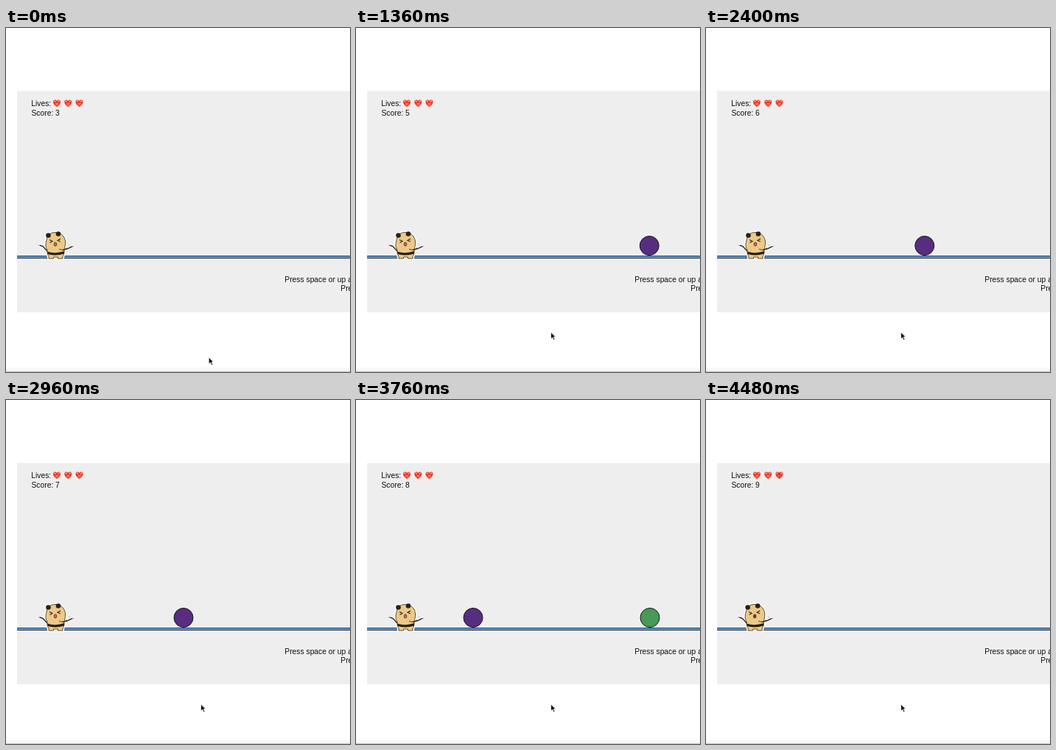
An HTML page for the animation above (4560 ms loop, 467 by 467 pixels).

```html
<!DOCTYPE html>
<html lang="en">
<head>
<meta charset="utf-8">
<title>Jump game</title>
<style>
  html, body { margin: 0; width: 100%; height: 100%; overflow: hidden; background: #fff; }
  svg { display: block; width: 467px; height: 467px; }
  text { font: 10.3px "Liberation Sans", Arial, sans-serif; fill: #111; }
</style>
</head>
<body>
<svg viewBox="0 0 467 467">
  <defs>
    <linearGradient id="fade" x2="0" y2="1">
      <stop offset="0" stop-color="#fff"/>
      <stop offset="1" stop-color="#f4f4f4"/>
    </linearGradient>
    <g id="heart">
      <path d="M0 5.2C-3 3-5 1-5-1.6C-5-5-1.4-5.6 0-3C1.4-5.6 5-5 5-1.6C5 1 3 3 0 5.2Z" fill="#ee3524"/>
      <path d="M-3.6-3.2l2 1.6M3.6-3.2l-2 1.6M-1.6.6Q0 2 1.8.4" fill="none" stroke="#ffd9c4" stroke-width="1.1"/>
      <path d="M-2.6 2.3L0 4.3L2.6 2.3" fill="none" stroke="#f98a3c" stroke-width=".9"/>
    </g>
    <path id="body" d="M55 288C56 280 61 277.500 67 277.500C75 277.500 80 283 80.500 290C81 295 79.500 298 79 301C79.500 305 78.500 308 77 310V313H70.500V311H64.500V313H58V310C56 307 55.500 304 56 301C53.500 298 53.500 293 55 288Z"/>
    <path id="arms" d="M56 303L50 296.500L46 295M77 301.500L84 299.500L90 296.500"/>
  </defs>

  <rect x="15" y="85.500" width="452" height="300.500" fill="#eee"/>
  <rect y="459" width="467" height="7" fill="url(#fade)"/>
  <rect y="466" width="467" height="1" fill="#c4c4c4"/>

  <text x="34.300" y="106">Lives:</text>
  <use href="#heart" x="69" y="102"/>
  <use href="#heart" x="84.300" y="102"/>
  <use href="#heart" x="99.500" y="102"/>
  <path id="crack" d="M100 98.500L98.700 101L100.500 102.500L99.300 105.500" fill="none" stroke="#5a1a14" stroke-width=".8"/>
  <text x="34.500" y="118.600" id="score">Score: 3</text>
  <text x="378.300" y="344.500">Press space or up arrow to jump</text>
  <text x="454.300" y="357">Press enter to start</text>

  <rect x="15" y="309" width="452" height="4" fill="#5b9bd5"/>
  <path d="M15 309.500H467M15 312.500H467" stroke="#2b3440" stroke-width=".9"/>

  <g id="hero">
    <g fill="#fff" stroke="#fff" stroke-width="4" stroke-linejoin="round" stroke-linecap="round">
      <use href="#body"/>
      <use href="#arms" fill="none"/>
      <circle cx="57.500" cy="281.500" r="2.500"/>
      <circle cx="71" cy="279.500" r="2.500"/>
    </g>
    <use href="#body" fill="#ecc987" stroke="#4a3a24" stroke-width=".9"/>
    <g fill="#25211f">
      <circle cx="57.500" cy="281.500" r="3.300"/>
      <circle cx="71" cy="279.500" r="3.300"/>
      <path d="M56 303.500Q67 307 79 303V306.500Q67 310 56.500 307Z"/>
    </g>
    <use href="#arms" fill="none" stroke="#35302e" stroke-width="1.500"/>
    <path d="M72 300Q77 303 83 298.500" fill="none" stroke="#4a3a24" stroke-width="1"/>
    <path d="M59 287.500L63 289.500L59.500 291.500M74 286L70 288.500L74 290" fill="none" stroke="#2b221b" stroke-width="1.100"/>
    <ellipse id="mouth" cx="67" cy="293.500" rx="1.800" ry="2.500" fill="#e2606c" stroke="#3a241c" stroke-width=".8"/>
    <g fill="#e58d97">
      <circle cx="45" cy="295" r="1.100"/>
      <circle cx="91" cy="296.500" r="1.100"/>
      <circle cx="86" cy="294.500" r=".7"/>
    </g>
  </g>

  <g id="balls" stroke="#17151c" stroke-width="1">
    <circle cy="295.500" r="13" fill="#572d80"/>
    <circle cx="240" cy="295.500" r="13" fill="#479a57"/>
  </g>

  <path id="cursor" d="M0 0V9.200L2.200 7.200L3.800 10.800L5.500 10L3.900 6.600H6.700Z" fill="#111" stroke="#fff" stroke-width=".8"/>
</svg>
<script>
  const LOOP = 4560, STEP = 80, HIT = 4400;
  const ballPath = [[0, 528], [880, 444], [1840, 352.5], [2960, 241], [3440, 191.5], [4080, 126.5], [4400, 94]];
  const el = id => document.getElementById(id);
  const [score, balls, hero, mouth, crack, cursor] =
    ["score", "balls", "hero", "mouth", "crack", "cursor"].map(el);

  function along(path, t) {
    const i = Math.max(1, path.findIndex(p => p[0] >= t));
    const [t0, a] = path[i - 1], [t1, b] = path[i];
    return a + (b - a) * (t - t0) / (t1 - t0);
  }

  const move = (node, x, y = 0) => node.setAttribute("transform", `translate(${x} ${y})`);
  const show = (node, on) => node.setAttribute("visibility", on ? "visible" : "hidden");

  function draw(t) {
    const hit = t >= HIT;
    show(balls, !hit);
    if (!hit) move(balls, along(ballPath, t));

    // One point every 800 ms
    score.textContent = "Score: " + Math.floor(3.8 + t / 800);

    move(hero, hit ? -0.8 : 0);
    mouth.setAttribute("fill", hit ? "#7c3a38" : "#e2606c");
    show(crack, hit);

    const k = Math.min(1, Math.max(0, t / 520));
    const ease = k * k * (3 - 2 * k);
    move(cursor, 275.2 - 10.7 * ease, 447 - 34 * ease);
  }

  const start = performance.now();
  function tick() {
    const t = (performance.now() - start) % LOOP;
    draw(Math.floor(t / STEP) * STEP);
    requestAnimationFrame(tick);
  }
  draw(0);
  requestAnimationFrame(tick);
</script>
</body>
</html>
```
